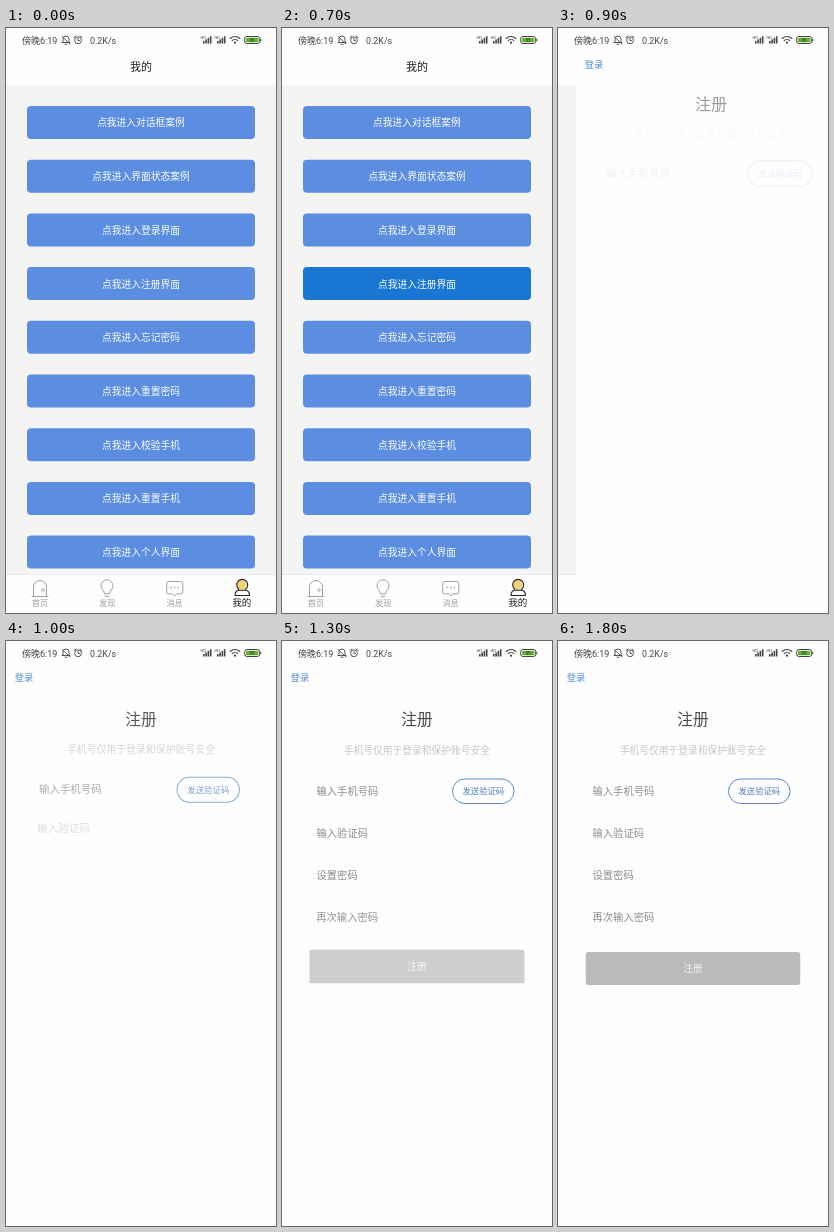
Write an HTML page that moves like this. It is 270 by 585 pixels and loops after 2000 ms.

```html
<!DOCTYPE html>
<html lang="zh-CN">
<head>
<meta charset="utf-8">
<style>
html, body { margin: 0; width: 100%; height: 100%; overflow: hidden; background: #fefefe; }
svg { display: block; font-family: "Noto Sans CJK SC", "Noto Sans CJK", sans-serif; font-weight: 300; }
.latin { font-family: Roboto, "Noto Sans CJK SC", sans-serif; font-weight: 400; }
.line { fill: none; stroke-linecap: round; stroke-linejoin: round; }
</style>
</head>
<body>
<svg id="stage" width="270" height="585">
  <clipPath id="formClip"><rect x="27.5" y="50" width="215" height="500"/></clipPath>
  <g id="home"></g>
  <g id="register"></g>
  <g id="status"></g>
</svg>
<script>
const $ = id => document.getElementById(id);

// Text centred vertically on y
const text = (s, x, y, size, fill, anchor = 'middle', cls = '') =>
  `<text x="${x}" y="${y + size * .38}" font-size="${size}" fill="${fill}" text-anchor="${anchor}" class="${cls}">${s}</text>`;
const rect = (x, y, w, h, r, fill, more = '') =>
  `<rect x="${x}" y="${y}" width="${w}" height="${h}" rx="${r}" fill="${fill}" ${more}/>`;
const line = (d, color, width = 1) =>
  `<path class="line" d="${d}" stroke="${color}" stroke-width="${width}"/>`;

// Home page
const labels = ['对话框案例', '界面状态案例', '登录界面', '注册界面', '忘记密码',
  '重置密码', '校验手机', '重置手机', '个人界面'];
const buttons = labels.map((s, i) => {
  const y = 78 + i * 53.7;
  return rect(21, y, 228, 33, 4, '#5b8ee0', `id="b${i}"`) +
    text('点我进入' + s, 135, y + 16.7, 9.75, '#fff');
}).join('');
const grey = '#a0a0a0', dark = '#222';
const nav =
  line('M26 568.5H42M27.5 568V559a6.5 6.5 0 0 1 13 0V568', grey) +
  `<circle cx="37" cy="562" r="1.3" fill="none" stroke="${grey}" stroke-width=".8"/>` +
  line('M98.5 565.5C98.5 562.5 95 561.5 95 557.8a6 6 0 0 1 12 0C107 561.5 103.5 562.5 103.5 565.5ZM99 568.3H103', grey) +
  line('M162.5 553.5H175a1.8 1.8 0 0 1 1.8 1.8V564a1.8 1.8 0 0 1-1.8 1.8H171L168.8 568 166.6 565.8H162.5a1.8 1.8 0 0 1-1.8-1.8V555.3a1.8 1.8 0 0 1 1.8-1.8Z', grey) +
  line('M165.2 559.5h.1M168.7 559.5h.1M172.2 559.5h.1', grey, 1.5) +
  '<circle cx="235.5" cy="557" r="4.8" fill="#f5cf78"/>' +
  line('M232.8 561.2a5.5 5.5 0 1 1 6.8 0M229 567.5c0-3.5 2-5.3 4.5-5.3h5.5c2.5 0 4.5 1.8 4.5 5.3Z', dark, 1.1) +
  ['首页', '发现', '消息'].map((s, i) => text(s, 34 + i * 67.3, 575, 8.2, grey)).join('') +
  text('我的', 235.7, 574.5, 9.5, dark);
$('home').innerHTML =
  rect(0, 0, 270, 585, 0, '#fefefe') + text('我的', 135, 38.5, 11, '#222') +
  rect(0, 57, 270, 489.5, 0, '#f4f4f2') + buttons +
  rect(0, 546.5, 270, 39, 0, '#fefefe') + rect(0, 546, 270, .8, 0, '#e6e6e6') + nav;

// Register page: [start ms, centre y, height, content]
const field = (s, y) => text(s, 34.5, y, 10.3, '#8c8c8c', 'start');
const items = [
  [820, 78, 24, text('注册', 135, 78, 15.7, '#4a4a4a')],
  [885, 109, 14, text('手机号仅用于登录和保护账号安全', 135, 109, 9.75, '#c4c4c4')],
  [885, 150, 26, field('输入手机号码', 150) +
    rect(170.5, 138, 61.5, 24.5, 12.2, 'none', 'stroke="#5b8bc8"') +
    text('发送验证码', 201.3, 150.3, 8.3, '#4a7dc0')],
  [960, 192, 34, field('输入验证码', 192)],
  [1035, 234, 34, field('设置密码', 234)],
  [1110, 276, 34, field('再次输入密码', 276)],
  [1185, 327.5, 33, rect(27.5, 311, 215, 33, 3.5, '#bababa') + text('注册', 135, 327.5, 9.7, '#f4f4f4')]
];
$('register').innerHTML = rect(0, 0, 270, 585, 0, '#fefefe') +
  text('登录', 8.7, 36.3, 9.3, '#4d8bcc', 'start') +
  `<g clip-path="url(#formClip)">${items.map((it, i) => `<g id="i${i}">${it[3]}</g>`).join('')}</g>`;

// Status bar
const ink = '#444';
const signal = x => text('HD', x, 9.5, 4, ink, 'start', 'latin') +
  [0, 1, 2, 3].map(i => rect(x + 2.5 + i * 2.3, 13 - i * 1.6, 1.6, 2.5 + i * 1.6, 0, ink)).join('');
$('status').innerHTML =
  text('傍晚6:19', 16, 12.2, 9, ink, 'start', 'latin') +
  line('M57 14.5V11a3 3 0 0 1 6 0V14.5M56 14.5H64M59 16.2H61M56.2 8.5 64 16', ink, .9) +
  `<circle cx="72" cy="12.3" r="3.4" fill="none" stroke="${ink}" stroke-width=".9"/>` +
  line('M72 10.5V12.5H73.5M68 9.5 70 8M76 9.5 74 8', ink, .9) +
  text('0.2K/s', 84, 12.2, 8.9, ink, 'start', 'latin') +
  signal(194.5) + signal(208.5) +
  line('M224.2 10.5a6.7 6.7 0 0 1 9.6 0M226.2 12.6a4 4 0 0 1 5.6 0', ink, 1.1) +
  `<circle cx="229" cy="14.7" r="1.1" fill="${ink}"/>` +
  rect(238.7, 8.5, 15, 7, 2.2, '#fefefe', `stroke="${ink}"`) +
  rect(240, 9.8, 12.4, 4.4, 1, '#62b32e') + rect(254.2, 10.7, 1, 2.8, .4, ink) +
  text('85', 246, 12, 4.5, '#333', 'middle', 'latin');

const clamp = x => Math.max(0, Math.min(1, x));

function draw(t) {
  const slide = 270 * (.5 - Math.cos(Math.PI * clamp((t - 699) / 241)) / 2);
  $('home').setAttribute('transform', `translate(${-slide})`);
  $('register').setAttribute('transform', `translate(${270 - slide})`);
  $('b3').setAttribute('fill', t >= 500 && t < 800 ? '#1976d2' : '#5b8ee0');
  items.forEach(([start, y, h], i) => {
    const left = (1 - clamp((t - start) / 250)) ** 2;
    $('i' + i).setAttribute('opacity', 1 - left);
    $('i' + i).setAttribute('transform',
      `translate(135 ${y - h * .2 * left}) scale(${1 + .05 * left}) translate(-135 ${-y})`);
  });
}

// The screen refreshes in steps of 100 ms
const begin = performance.now();
function tick() {
  draw(Math.floor((performance.now() - begin) % 2000 / 100) * 100);
  requestAnimationFrame(tick);
}
tick();
</script>
</body>
</html>
```
